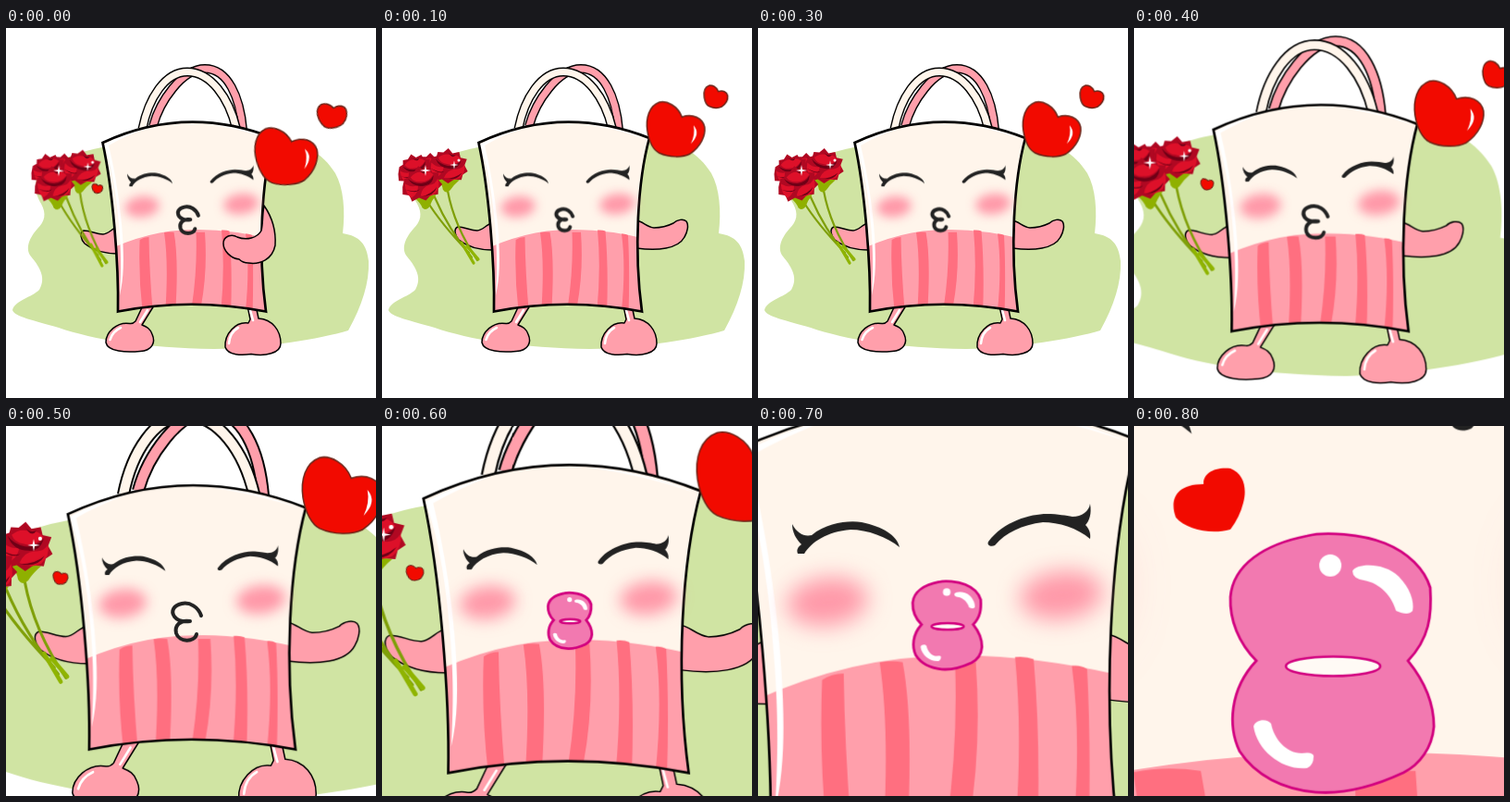
An HTML page that plays this animation: 400x400 px, repeating every 1.18 s.

```html
<!DOCTYPE html>
<html lang="en">
<head>
<meta charset="utf-8">
<title>Blowing a kiss</title>
<style>
html, body { margin: 0; width: 100%; height: 100%; overflow: hidden; background: #fff; }
svg { display: block; width: 400px; height: 400px; overflow: hidden; }
path, ellipse { vector-effect: non-scaling-stroke; }

.ink { stroke: #000; stroke-width: 1.5; stroke-linejoin: round; stroke-linecap: round; }
.skin { fill: #ff9fab; }
.shine { fill: none; stroke: #fff; stroke-width: 2.6; stroke-linecap: round; }
.stem { fill: none; stroke: #7f9f08; stroke-width: 2.2; stroke-linecap: round; vector-effect: none; }
.tip { stroke: #8fb400; stroke-width: 3.2; }
.mouth { fill: none; stroke: #222; stroke-width: 4; stroke-linecap: round; stroke-linejoin: round; vector-effect: none; }
.handle { fill: none; vector-effect: none; }

.anim { animation: 1180ms step-end infinite; transform-origin: 0 0; }
.zoom { animation-name: zoom; }
.kiss { animation-name: kiss; }
.open { animation-name: open; }
.wide { animation-name: wide; }
.small { animation-name: small; }
.lips { animation-name: lips; }
.puff { animation-name: puff; }
.spark { animation-name: spark; }
.sway { animation-name: sway; }
.grip { animation-name: grip; }
.big-heart { animation-name: bigHeart; }
.far-heart { animation-name: farHeart; }

/* 100 ms is 8.474 % of the loop */
@keyframes zoom {
  0% { transform: none; }
  33.898% { transform: translate(-39px, -38.4px) scale(1.195); }
  42.372% { transform: translate(-78.8px, -77.6px) scale(1.394); }
  50.847% { transform: translate(-125px, -123.1px) scale(1.625); }
  59.322% { transform: translate(-272px, -265.9px) scale(2.36); }
  67.796%, 100% { transform: translate(-1185.6px, -1157.2px) scale(6.93); }
}
@keyframes kiss {
  0%, 16.949% { opacity: 1; }
  8.474%, 25.423%, 100% { opacity: 0; }
}
@keyframes open {
  0%, 16.949% { opacity: 0; }
  8.474%, 25.423%, 100% { opacity: 1; }
}
@keyframes wide {
  0%, 16.949%, 33.898% { opacity: 1; }
  8.474%, 25.423%, 50.847%, 100% { opacity: 0; }
}
@keyframes small {
  0%, 16.949%, 33.898%, 100% { opacity: 0; }
  8.474%, 25.423% { opacity: 1; }
}
@keyframes lips {
  0% { opacity: 0; transform: translate(16.3px, 20.3px) scale(.92); }
  50.847% { opacity: 1; transform: translate(16.3px, 20.3px) scale(.92); }
  59.322%, 100% { opacity: 1; transform: none; }
}
@keyframes puff {
  0% { opacity: 0; }
  67.796%, 100% { opacity: 1; }
}
@keyframes spark {
  0%, 16.949%, 33.898%, 100% { opacity: 1; }
  8.474%, 25.423% { opacity: 0; }
}
@keyframes sway {
  0%, 16.949% { transform: translate(5px, 3px) rotate(3deg); }
  8.474%, 25.423%, 100% { transform: none; }
}
@keyframes grip {
  0%, 16.949% { transform: translate(2px, 4px); }
  8.474%, 25.423%, 100% { transform: none; }
}
@keyframes bigHeart {
  0%, 16.949% { transform: translate(303.5px, 137.5px) rotate(-7deg) scale(1.07); }
  8.474%, 25.423%, 100% { transform: translate(317.8px, 109.2px); }
}
@keyframes farHeart {
  0%, 16.949% { transform: translate(353px, 93.5px) rotate(-18deg) scale(.5, .48); }
  8.474%, 25.423%, 100% { transform: translate(361px, 74px) scale(.41); }
}
</style>
</head>
<body>
<svg viewBox="0 0 400 400">
  <defs>
    <path id="heart" d="M6.5-13C2-25-10-31-18-29C-29-25-33-12-31 2C-29 14-24 23-18 26C-7 31 7 31 15 27C27 19 32 7 31-2C29-12 18-17 6.5-13Z"/>
    <path id="bag" d="M104.500 124Q195 82 289 119C276.500 165 272 240 281 306.500Q200 291 121 306.500C122 255 115.500 175 104.500 124Z"/>
    <clipPath id="inside"><use href="#bag"/></clipPath>
    <filter id="soft" x="-1" y="-1" width="3" height="3"><feGaussianBlur stdDeviation="12"/></filter>
    <path id="curl" d="M211 205C208 196 199 190 190 192C181 194 178 200 182 206C186 211 192 212 199 211C188 209 182 216 184 224C187 234 204 234 206 225"/>
    <g id="rose">
      <path fill="#8fb000" d="M-10 13Q-4 20-3 25Q1 30 5 25Q8 19 14 13Z"/>
      <path fill="#b00822" d="M-21 0L-18-8L-13-10L-12-15L-6-15L-1-20L4-15L11-17L13-11L20-10L18-3L22 3L17 7L16 13L8 13L2 18L-5 14L-13 17L-15 10L-22 8Z"/>
      <path fill="#dd1029" d="M-18-3Q-10 3-4 0Q-5 10-13 13Q-19 8-18-3ZM-3 12Q0 3 8 2Q15 2 18-4Q20 5 14 11Q6 16-3 12ZM-11-9Q-5-15 2-13Q9-15 14-9Q7-1-1-3Q-8-3-11-9Z"/>
      <path fill="#6f0016" d="M-14-8Q-9-2 0-1Q9-1 14-8Q12 2 3 2Q-9 3-14-8ZM-2-18Q1-11 8-14Q4-7-2-18ZM-19 3Q-8 8-3 5Q-7 10-19 3ZM-2 13Q9 12 16 5Q11 15-2 13Z"/>
    </g>
    <path id="star" fill="#fff" d="M0-6L1-1L6 0L1 1L0 6L-1 1L-6 0L-1-1Z"/>
  </defs>

  <g class="anim zoom">
    <path fill="#d0e4a3" d="M104 129C82 133 55 142 38 156C29 165 31 178 38 190C44 201 42 209 34 217C26 226 20 238 27 247C38 260 43 271 36 283C28 291 9 295 7 305C9 312 30 316 57 324C95 337 150 346 225 347C280 346 340 336 370 327C385 300 393 275 392 252C390 234 383 225 364 222C367 198 365 173 356 157C343 136 320 121 288 117Z"/>

    <path class="handle" stroke="#000" stroke-width="10" d="M159 106C166 80 190 44 215 44C240 44 253 75 256 110"/>
    <path class="handle" stroke="#ff9fab" stroke-width="7.2" d="M159 106C166 80 190 44 215 44C240 44 253 75 256 110"/>
    <path class="handle" stroke="#000" stroke-width="10" d="M147.500 109C154 76 172 47.500 196 47.500C221 47.500 241 75 249 109"/>
    <path class="handle" stroke="#fff5eb" stroke-width="7.2" d="M147.500 109C154 76 172 47.500 196 47.500C221 47.500 241 75 249 109"/>

    <path class="ink skin" d="M148 300L140 317Q137 320 134 319.500C120 317 108 329 108 340C110 350 130 351 145 349.500C158 349 162 340 158 331C156 325 152 323 147 321L160 300Z"/>
    <path class="ink skin" d="M261 300L264 315L262 319C248 317 236 331 237 345C240 354 255 354 265 352.500C280 355 297 352 297 341C297 327 288 315 273 314L270 300Z"/>
    <path class="shine" d="M112.500 337Q115 328 124 324M153 305L145 318M241 341Q242 329 251 324M264 305L267 316"/>

    <path class="anim grip ink skin" d="M119 211C113 212 109 219 103 219C95 219 90 215 82 215C77 217 79 225 83 229C93 237 105 240 120 240Z"/>
    <path class="anim open ink skin" d="M275 208C282 209 286 215 294 216C303 216 311 213 315 211C319 207 326 206 329 209C332 213 330 221 327 226C320 239 298 241 275 238Z"/>

    <use href="#bag" fill="#fff5eb"/>
    <g clip-path="url(#inside)">
      <path fill="#ff9fab" d="M100 245Q152 218 203 218Q242 217 290 229V320H100Z"/>
      <path fill="#ff6f80" d="M144.600 229Q149 226 154.500 226Q155 265 159 310H148Q143 270 144.600 229ZM171 221Q176 220 181.500 220.800Q187 250 183 310H172Q176 255 171 221ZM205.500 220.800H215Q218 262 211 300H201Q207 260 205.500 220.800ZM233 218.500Q238 218 241.500 219.500Q245 260 243 310H232Q237 260 233 218.500ZM259 222.500Q263 222 266 224Q268 262 266.500 310H258.500Q264 260 259 222.500Z"/>
      <path fill="#fff" d="M106 126Q126 115 150 109Q128 117 111 127C119 160 124 195 126 225C127.500 250 127.500 270 123 289C125 255 124 235 122 212C119 175 114 150 106 126ZM215 103.500Q252 106 285 120Q250 108 215 103.500Z"/>
    </g>
    <use href="#bag" fill="none" stroke="#000" stroke-width="2.7" stroke-linejoin="miter"/>

    <g transform="translate(200 197) scale(.4237) translate(-200 -199)">
      <g fill="#ff98a8" filter="url(#soft)">
        <ellipse cx="75" cy="190" rx="44" ry="26" transform="rotate(-7 75 190)"/>
        <ellipse cx="328" cy="183" rx="45" ry="26" transform="rotate(-7 328 183)"/>
      </g>
      <path fill="#222" d="M37 106C42 116 50 120 58 118C75 104 98 102 112 104C135 109 150 118 153 131C140 120 118 112 100 112C75 114 58 125 50 138L43 138C41 133 44 130 47 128C41 122 37 115 37 106ZM249 125C265 103 295 95 312 95C325 95 333 97 340 98C350 98 358 92 359 84C361 95 358 103 354 107C358 111 360 116 359 122C345 110 325 104 308 104C285 107 268 115 256 129C252 131 247 129 249 125Z"/>
      <g class="anim lips">
        <g transform="scale(.3406) translate(388 376)">
          <path fill="#f279b0" stroke="#d2007f" stroke-width="2.8" d="M186 119C205 114 245 117 270 127C295 137 313 155 319 175C321 205 318 230 295 254C312 275 323 298 323 325C321 348 308 366 290 375C262 388 230 399 195 396C160 393 130 378 113 352C100 325 102 285 131 254C112 235 102 210 103 185C106 150 140 128 186 119Z"/>
          <ellipse cx="214" cy="260" rx="51" ry="10.500" fill="#fffaf5" stroke="#d2007f" stroke-width="2.5"/>
          <circle cx="211" cy="151" r="12" fill="#fff"/>
          <path fill="#fff" d="M235 157C240 148 270 148 285 163C297 175 302 190 300 200Q295 206 282 200C278 185 265 170 247 167Q235 165 235 157ZM128 325C130 317 143 316 147 322C150 338 163 354 180 354Q192 352 193 357Q193 367 186 370C160 373 132 352 128 325Z"/>
        </g>
      </g>
    </g>

    <g class="anim wide">
      <use class="mouth" href="#curl" transform="translate(200 197) scale(.7174) translate(-200 -197)"/>
    </g>
    <g class="anim small">
      <use class="mouth" href="#curl" transform="translate(197.500 207) scale(.58) translate(-196 -211)"/>
    </g>
    <g class="anim puff" fill="#f20a00">
      <path transform="translate(182.800 178.500) scale(.1443) translate(-81 -80)" d="M75 63C74 52 86 44 104 46C119 52 122 68 118 83Q114 99 104 112C83 118 56 112 45 99C39 83 42 63 75 63Z"/>
    </g>

    <path class="anim kiss ink skin" d="M279 192C288 205 292 220 291 235C288 250 275 256 262 254C258 254 254 252 252 250C243 249 235 241 235 233C235 225 244 222 250 226C260 230 272 227 276 219C278 211 277 202 279 192Z"/>

    <g transform="translate(100 250)">
      <g class="anim sway">
        <g transform="translate(-100 -250)">
          <path class="stem" d="M48 186Q64 212 94 243M57 183Q72 218 97 248M71 176Q78 214 103 251"/>
          <path class="stem tip" d="M86 232L99 254M92 236L104 250"/>
          <use href="#rose" transform="translate(53 152) scale(.85)"/>
          <use href="#rose" transform="translate(36 154) rotate(-12) scale(.9)"/>
          <use href="#rose" transform="translate(71 150) rotate(5)"/>
          <use href="#rose" transform="translate(43 169) rotate(-8)"/>
          <use href="#star" transform="translate(47 154)"/>
          <use href="#star" transform="translate(78 148) scale(.8)"/>
          <circle cx="83" cy="143" r="1.500" fill="#fff"/>
        </g>
      </g>
    </g>

    <g fill="#f20a00" stroke="#6a2418" stroke-width="1.5">
      <g class="anim spark"><use href="#heart" transform="translate(99 173) rotate(-15) scale(.18)" stroke-width="1"/></g>
      <g class="anim far-heart"><use href="#heart"/></g>
      <g class="anim big-heart">
        <use href="#heart"/>
        <path fill="#fff" stroke="none" d="M19-4Q27 5 16 16Q21 6 19-4Z"/>
      </g>
    </g>
  </g>
</svg>
</body>
</html>
```
